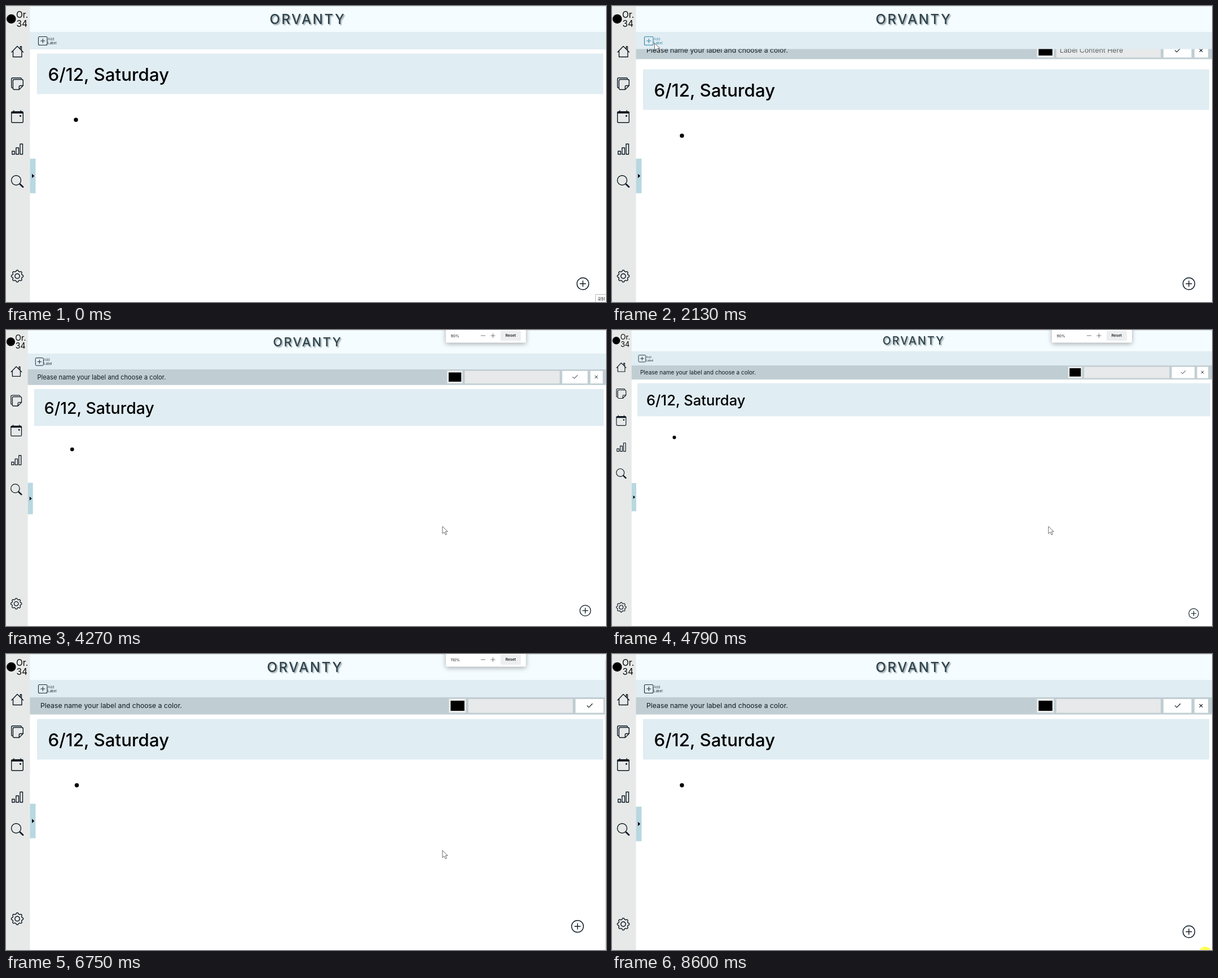
Recreate the animation shown at these times as an HTML page. Size 1064 by 526 pixels, loop 8670 ms.

```html
<!DOCTYPE html>
<html lang="en">
<head>
<meta charset="utf-8">
<title>Daily notes</title>
<style>
  html, body { margin: 0; width: 100%; height: 100%; overflow: hidden; background: #fff; }
  svg { display: block; width: 1064px; height: 526px; font-family: Inter, sans-serif; }
  .icon { fill: none; stroke: #0b1822; stroke-width: 1.4; stroke-linejoin: round; stroke-linecap: round; }
  .solid { fill: #0b1822; }
  .bold { stroke-width: 2.8; }
  .fine { stroke-width: 1.1; }
  #brand { font-size: 24px; font-weight: 500; letter-spacing: 2.6px; fill: #30434b;
           text-anchor: middle; text-shadow: 2px 2px 2px #9aa8ad; }
  #add { --ink: #1b2a33; }
  #add.hover { --ink: #3583a3; }
  #add path { fill: none; stroke: var(--ink); stroke-width: 1.1; }
  #add text { font-size: 6.1px; fill: var(--ink); }
  #popup rect { filter: drop-shadow(0 2px 4px #0005); }
  #popup .button { filter: none; }
  #popup text { font-size: 6.8px; fill: #222; }
</style>
</head>
<body>
<svg viewBox="0 0 1064 526">
  <g id="page">
    <g id="content">
      <rect id="titleBox" x="55" y="84.5" height="72" fill="#e0edf3"/>
      <text x="74.5" y="132.5" font-size="31.3" font-weight="500">6/12, Saturday</text>
      <circle id="bullet" cy="202.3" r="3.7"/>
    </g>

    <g id="bar">
      <rect id="barBack" y="76.5" height="31" fill="#c0ced3"/>
      <text x="61" y="96.3" font-size="12.25" fill="#101a1f">Please name your label and choose a color.</text>
      <g id="controls">
        <rect x="753.5" y="79.5" width="30" height="25" fill="#ebecec"/>
        <rect x="756.5" y="83" width="24.5" height="18"/>
        <rect x="788" y="80" width="185" height="24.5" fill="#e7e9ea"/>
        <text id="hint" x="794" y="96.3" font-size="12.3" fill="#5a6165">Label Content Here</text>
        <path d="M978 80h49.5v24.5h-49.5zM1033 80h24v24.5h-24z" fill="#fff"/>
        <path class="icon fine" d="M998.5 91.8l3 3 6.2-6.3M1042 89.3l5 5m0-5l-5 5"/>
      </g>
    </g>

    <rect width="1400" height="46" fill="#f4fcff"/>
    <rect y="46" width="1400" height="30.5" fill="#e0edf3"/>
    <text id="brand" y="32">ORVANTY</text>
    <g id="add">
      <path d="M59.5 54.5h11.5q2 0 2 2v11q0 2-2 2h-11.5q-2 0-2-2v-11q0-2 2-2zM65.3 58v8M61.3 62h8"/>
      <text x="74" y="61" font-weight="300">Add</text>
      <text x="74" y="68.2">Label</text>
    </g>

    <rect width="42.5" height="700" fill="#e7e9e8"/>
    <circle cx="9.3" cy="23" r="8.3"/>
    <g font-size="15.5"><text x="18" y="21">Or.</text><text x="18.5" y="36.5">34</text></g>
    <g class="icon">
      <path d="M10 82l10-10.5L30.500 82M12.5 80v10.500h15.500V80M25.300 76v-4h2.200v6.500"/>
      <path d="M11 145.500q-1.300-.5-1.300-2V130q0-2.300 2.300-2.300h13.500q1.500 0 2 1.300M14.700 130.500h13.300q2.300 0 2.300 2.300v8.700l-7 7h-8.600q-2.300 0-2.300-2.300v-13.400q0-2.300 2.300-2.300zM23.300 148.500v-5q0-2 2-2h5"/>
      <path d="M11.700 187.700h16.600q2 0 2 2v15.600q0 2-2 2H11.700q-2 0-2-2v-15.600q0-2 2-2zM13.800 185.700v2M26.200 185.700v2"/>
      <path class="bold" d="M10.500 189.500h19"/>
      <circle class="solid" cx="25.500" cy="195.300" r=".9"/>
      <path d="M10.800 258h4.500v5.500h-4.500zM17.800 252h4.700v11.500h-4.700zM25 245.300h4.500v18.200H25z"/>
      <circle cx="18" cy="309.800" r="8.500"/>
      <path class="bold" d="M25 316.800l5 4.700"/>
      <g id="gear"><path id="cog"/><circle r="4.200"/></g>
      <g id="plus"><circle r="10.500"/><path d="M-5 0H5M0-5V5"/></g>
    </g>

    <g id="tab">
      <rect x="42.500" y="-30.700" width="10" height="61.400" fill="#b8d8e1"/>
      <path d="M46-3.800L50.300 0 46 3.800z"/>
    </g>
  </g>

  <path d="M0 .5H1064" stroke="#d9e0e3"/>
  <g id="scrollbar"><path d="M1062 0h2v526h-2z" fill="#f6f6f6"/><path d="M1063 10V526" stroke="#cfd2d3"/></g>

  <g id="popup">
    <rect x="780" y="-6" width="142" height="28.500" rx="2" fill="#fff"/>
    <rect class="button" x="877" y="1.500" width="36" height="17.500" rx="1.500" fill="#eceef0"/>
    <text id="percent" x="788.500" y="12.600"></text>
    <path d="M842 10h8M859.500 10h8M863.500 6v8" stroke="#555" stroke-width=".8"/>
    <text x="895" y="12.400" font-weight="600" text-anchor="middle">Reset</text>
  </g>

  <path id="cursor" d="M0 0V12.800L3 10l2.400 5 2-1L5.200 9.300H9.300z" fill="#fff" stroke="#444" stroke-width=".8"/>
  <circle id="glow" cx="1052" cy="531" r="11" fill="#ffff55"/>
  <g id="corner">
    <rect x="1045.500" y="512.500" width="30" height="20" fill="#fff" stroke="#bbb"/>
    <text x="1049" y="522.500" font-size="6.600" fill="#444" style="font-family: 'Noto Sans CJK SC', 'Noto Sans CJK', sans-serif">录制</text>
  </g>
</svg>

<script>
const LOOP = 8670, WIDTH = 1070, HEIGHT = 550;
const SMALL = 1 / 1.1, TINY = 0.9 / 1.1;
const zooms = [[0, 1], [3060, SMALL], [4300, TINY], [5520, SMALL], [6503, 1]];
const moves = [   // start, end, x, y
  [0, 0, 1046, 530], [520, 1370, 75.5, 66], [2290, 2480, 774, 349], [7530, 8170, 1042, 530]
];

const el = id => document.getElementById(id);
const set = (id, name, value) => el(id).setAttribute(name, value);
const place = (id, x, y) => set(id, 'transform', `translate(${x} ${y})`);
const show = (id, visible) => set(id, 'opacity', +visible);
const mix = (a, b, p) => a + (b - a) * p;
const progress = (t, start, end) => Math.min(1, Math.max(0, (t - start) / (end - start || 1)));
const smooth = p => p * p * (3 - 2 * p);

// cubic-bezier(.25, .1, .25, 1)
function ease(x) {
  const curve = (a, b, u) => 3 * a * u * (1 - u) ** 2 + 3 * b * u * u * (1 - u) + u ** 3;
  let low = 0, high = 1;
  for (let i = 0; i < 24; i++) {
    const mid = (low + high) / 2;
    if (curve(.25, .25, mid) < x) low = mid; else high = mid;
  }
  return curve(.1, 1, low);
}

function cogPath() {
  const points = [];
  for (let i = 0; i < 96; i++) {
    const a = i / 96 * 2 * Math.PI;
    const r = 9.5 + 1.1 * Math.tanh(2 * Math.cos(8 * a));
    points.push(`${(r * Math.cos(a)).toFixed(2)} ${(r * Math.sin(a)).toFixed(2)}`);
  }
  return `M${points.join('L')}Z`;
}

function drawPage(t) {
  const step = zooms.findLastIndex(z => z[0] <= t);
  const [since, k] = zooms[step];
  const before = zooms[Math.max(0, step - 1)][1];
  // A length settles from its rescaled old value to its new one.
  const settle = (length, duration) =>
    mix(length(before) * k / before, length(k), ease(progress(t, since, since + duration)));

  const right = settle(() => WIDTH, 600);
  const overflow = right > WIDTH + .5;
  const inset = overflow ? 9.5 : 0;
  const bottom = (HEIGHT - inset) / k;

  set('page', 'transform', `scale(${k})`);
  set('titleBox', 'width', WIDTH / k - 66);
  set('bullet', 'cx', settle(s => 124 - 73.7 * (1 - s), 600) / k);
  set('barBack', 'width', right / k);
  place('controls', right / k - WIDTH, 0);
  set('brand', 'x', (534 - inset / 2) / k + 1);
  place('gear', 20, bottom - 70);
  place('plus', (WIDTH - inset) / k - 47, bottom - 56.5);
  place('tab', 0, (HEIGHT - inset / 2 - settle(s => 248 + 27.5 * (1 - s), 300)) / k);
  show('scrollbar', overflow);
}

function draw(t) {
  drawPage(t);

  const open = progress(t, 1450, 2290);
  place('content', 0, 31 * smooth(open));
  place('bar', 0, 31 * (open ** 2.6 - 1));
  show('hint', t < 2290);
  el('add').classList.toggle('hover', t > 1340 && t < 2310);

  show('popup', t >= 4270 && t < 8000);
  el('percent').textContent = t < 5510 ? '90%' : t < 6480 ? '100%' : '110%';

  let [, , x, y] = moves[0];
  for (const [start, end, toX, toY] of moves) {
    const p = smooth(progress(t, start, end));
    x = mix(x, toX, p);
    y = mix(y, toY, p);
  }
  place('cursor', x, y);
  show('glow', t >= 8600);
  set('corner', 'opacity', t < 20 ? 1 : t < 70 ? .5 : 0);
}

set('cog', 'd', cogPath());
const origin = performance.now();
function frame() {
  draw((performance.now() - origin) % LOOP);
  requestAnimationFrame(frame);
}
frame();
</script>
</body>
</html>
```
